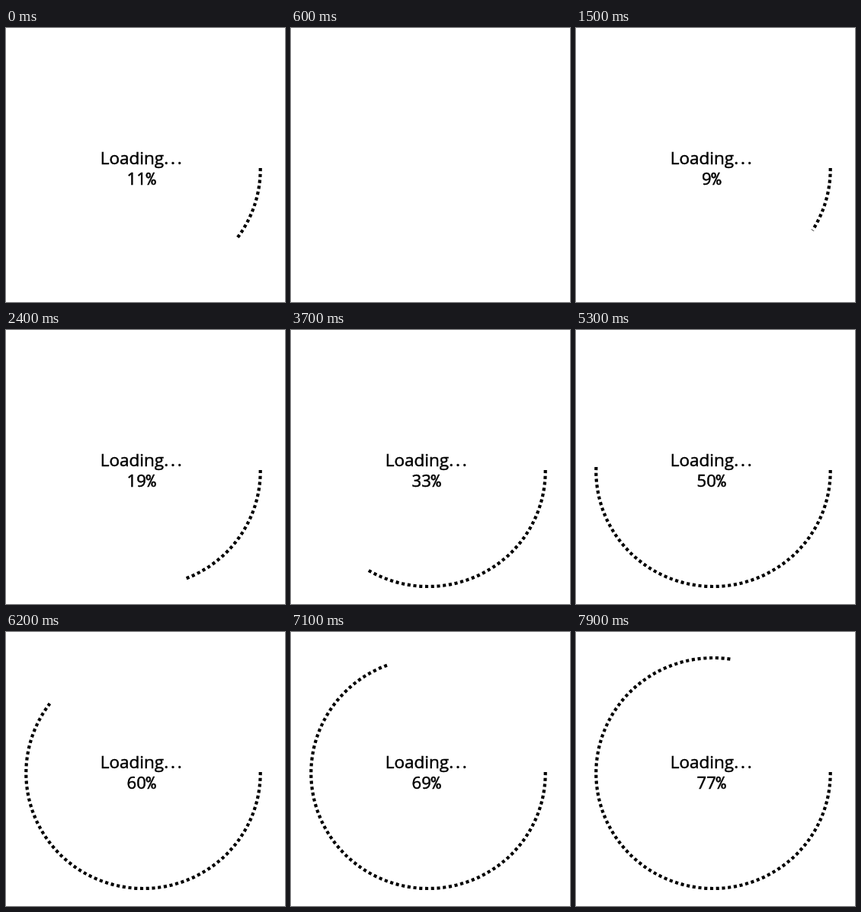
These frames come from a looping animation (366 by 360 pixels, 8 s). An HTML page with a canvas:

```html
<!DOCTYPE html>
<html lang="en">
<head>
<meta charset="utf-8">
<title>Loading</title>
<style>
  html, body { margin: 0; width: 100%; height: 100%; overflow: hidden; background: #fff; }
  canvas { display: block; }
</style>
</head>
<body>
<canvas id="stage" width="366" height="360"></canvas>
<script>
const ctx = document.getElementById('stage').getContext('2d');
const LOOP = 8000, TICK = 100;
const RING = { x: 180, y: 185.5, rx: 153.7, ry: 151.5, start: -0.55 };
const RAD = Math.PI / 180;

// Progress in percent at a tick, with a restart and one short stall.
function progressAt(tick) {
  if (tick < 6) return 10.9 + 1.055 * Math.min(tick, 3);
  if (tick < 22) return 9.4 + 1.166 * (Math.min(tick, 20) - 15);
  return 19.45 + 1.055 * (tick - 24);
}

function opacityAt(tick) {
  if (tick < 4 || tick >= 10) return 1;
  return Math.max(0, (6 - tick) / 3);
}

function drawRing(progress) {
  const angle = progress * 3.6;
  const end = angle + 0.5 - 2.6 * Math.cos((angle - 5) * RAD);
  ctx.lineWidth = 4.2;
  ctx.setLineDash([4.1, 3.675]);
  ctx.beginPath();
  ctx.ellipse(RING.x, RING.y, RING.rx, RING.ry, 0, RING.start * RAD, end * RAD);
  ctx.stroke();
}

// A hairline outline gives the letters a slightly heavier weight.
function write(text, x, y, size, family = '"Open Sans"') {
  ctx.font = `${size}px ${family}, sans-serif`;
  ctx.lineWidth = 0.5;
  ctx.setLineDash([]);
  ctx.fillText(text, x, y);
  ctx.strokeText(text, x, y);
  return x + ctx.measureText(text).width;
}

function drawLabel(progress) {
  const digits = String(Math.round(progress));
  write('Loading', 123.7, 178.7, 22.5);
  for (let i = 0; i < 3; i++) write('.', 207.3 + 8.7 * i, 178.7, 22.5);
  const left = 177.7 - (digits.length * 12.6 + 13) / 2;
  const right = write(digits, left, 205.7, 22);
  write('%', right, 205.7, 21.5, '"Noto Sans Mono"');
}

function draw(now) {
  const tick = Math.floor((now % LOOP) / TICK);
  const progress = progressAt(tick);
  ctx.globalAlpha = 1;
  ctx.fillStyle = '#fff';
  ctx.fillRect(0, 0, 366, 360);
  ctx.globalAlpha = opacityAt(tick);
  ctx.fillStyle = ctx.strokeStyle = '#000';
  if (ctx.globalAlpha > 0) {
    drawRing(progress);
    drawLabel(progress);
  }
}

const began = performance.now();
function loop() {
  draw(performance.now() - began);
  requestAnimationFrame(loop);
}
loop();
</script>
</body>
</html>
```
